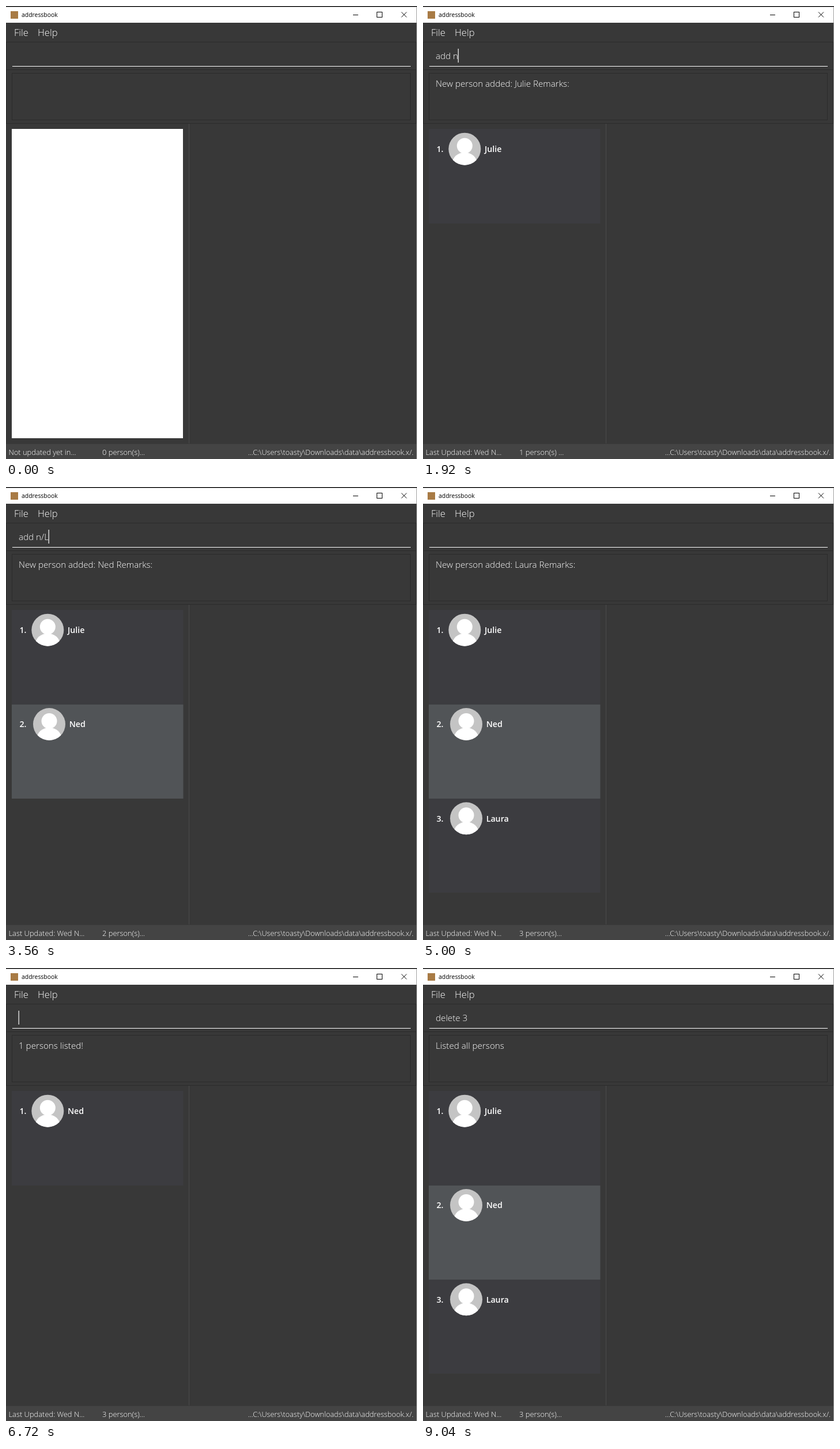
These frames come from a looping animation (713 by 785 pixels, 9.08 s). An HTML page with a canvas:

```html
<!DOCTYPE html>
<html lang="en">
<head>
<meta charset="utf-8">
<title>addressbook</title>
<style>
html, body { margin: 0; width: 100%; height: 100%; overflow: hidden; background: #383838; }
canvas { display: block; }
</style>
</head>
<body>
<canvas id="stage" width="713" height="785"></canvas>
<script>
const ctx = document.getElementById('stage').getContext('2d');
const LOOP = 9080, TICK = 40;
const FAMILY = '"Open Sans", "Noto Sans", sans-serif';
const BG = '#383838', EDGE = '#2b2b2b';
const CARD_TOP = 213.4, CARD_H = 163.3;
const PEOPLE = ['Julie', 'Ned', 'Laura'];

const added = name => `New person added: ${name} Remarks:`;

// Each command: first key, time per key, Enter, and what Enter shows.
const COMMANDS = [
  { text: 'add n/Julie', start: 120, step: 100, enter: 1440,
    message: added('Julie'), list: PEOPLE.slice(0, 1), total: 1 },
  { text: 'add n/Ned', start: 1520, step: 90, enter: 2480,
    message: added('Ned'), list: PEOPLE.slice(0, 2), total: 2 },
  { text: 'add n/Laura', start: 3000, step: 90, enter: 4160,
    message: added('Laura'), list: PEOPLE, total: 3 },
  { text: 'find Ned', start: 5480, step: 130, enter: 6560,
    message: '1 persons listed!', list: ['Ned'], total: 3 },
  { text: 'list', start: 7100, step: 100, enter: 7640,
    message: 'Listed all persons', list: PEOPLE, total: 3 },
  { text: 'delete 3', start: 8240, step: 80, enter: Infinity }
];

function stateAt(t) {
  const s = { input: '', message: '', list: [], total: 0, lastKey: -1000 };
  for (const c of COMMANDS) {
    if (t < c.start) break;
    if (t >= c.enter) {
      Object.assign(s, { message: c.message, list: c.list, total: c.total, lastKey: c.enter, input: '' });
    } else {
      const n = Math.min(c.text.length, Math.floor((t - c.start) / c.step) + 1);
      s.input = c.text.slice(0, n);
      s.lastKey = c.start + (n - 1) * c.step;
    }
  }
  const phase = t % 1000;
  s.caret = t - s.lastKey < 160 || (phase >= 450 && phase < 950);
  return s;
}

function rect(x, y, w, h, color) {
  ctx.fillStyle = color;
  ctx.fillRect(x, y, w, h);
}

function frame(x, y, w, h, color) {
  ctx.strokeStyle = color;
  ctx.lineWidth = 1;
  ctx.strokeRect(x + 0.5, y + 0.5, w - 1, h - 1);
}

function text(str, x, y, size, weight = 300, color = '#fff', align = 'left') {
  ctx.font = `${weight} ${size}px ${FAMILY}`;
  ctx.textAlign = align;
  ctx.fillStyle = color;
  ctx.fillText(str, x, y);
}

function disc(x, y, rx, ry, color) {
  ctx.fillStyle = color;
  ctx.beginPath();
  ctx.ellipse(x, y, rx, ry, 0, 0, Math.PI * 2);
  ctx.fill();
}

function titleBar() {
  rect(0, 0, 713, 1.5, '#000');
  rect(0, 1.5, 713, 27.5, '#fff');
  rect(8, 9, 13, 13, '#a87b45');
  text('addressbook', 27, 19, 10.4, 400, '#000');
  rect(602, 15, 9, 1, '#000');
  frame(643, 10, 10, 10, '#000');
  ctx.beginPath();
  ctx.moveTo(686, 10.5);
  ctx.lineTo(695, 19.5);
  ctx.moveTo(695, 10.5);
  ctx.lineTo(686, 19.5);
  ctx.stroke();
}

function panels() {
  text('File', 14, 52, 16.5);
  text('Help', 55, 52, 16.5);
  frame(0, 62, 712, 49, EDGE);
  rect(11, 104, 691, 1, '#fff');
  frame(0, 110, 712, 94, EDGE);
  frame(10, 116, 692, 82, EDGE);
  rect(317, 204, 1, 554, '#4b4b4b');
}

function avatar(x, y) {
  disc(x, y, 28, 28, '#c4c4c4');
  ctx.save();
  ctx.beginPath();
  ctx.arc(x, y, 28, 0, Math.PI * 2);
  ctx.clip();
  disc(x, y - 5.5, 13.5, 13.5, '#fff');
  disc(x, y + 25, 21.5, 19, '#fff');
  ctx.restore();
}

function card(name, i) {
  const y = CARD_TOP + i * CARD_H;
  const top = Math.round(y), bottom = Math.round(y + CARD_H);
  const base = Math.round(y + 39.6);
  const shift = i ? 2.7 : 0;
  rect(10, top, 297.5, bottom - top, i % 2 ? '#515457' : '#3c3c40');
  text(`${i + 1}.`, 23.5, base, 14.2, 600);
  avatar(72.3 + shift, y + 34.3);
  text(name, 107 + shift, base, 14.2, 600);
}

function statusBar(total) {
  rect(0, 759, 713, 26, '#444');
  text(total ? 'Last Updated: Wed N...' : 'Not updated yet in...', 4.5, 778, 12.9);
  text(`${total} person(s)${total === 1 ? ' ' : ''}...`, 167, 778, 12.9);
  text('...C:\\Users\\toasty\\Downloads\\data\\addressbook.x/.', 707, 778, 12.7, 300, '#fff', 'right');
}

function draw(t) {
  const s = stateAt(t);
  rect(0, 0, 713, 785, BG);
  titleBar();
  panels();
  text(s.input, 22, 92, 15.2);
  if (s.caret) rect(21.5 + ctx.measureText(s.input).width, 74, 1.5, 24, '#d8d8d8');
  text(s.message, 22, 140, 15.2);
  if (s.total) s.list.forEach(card);
  else rect(10, 213, 297, 536, '#fff');
  statusBar(s.total);
  rect(712, 1, 1, 784, '#a0a0a0');
}

const begin = performance.now();
function loop() {
  const t = (performance.now() - begin) % LOOP;
  draw(Math.floor(t / TICK) * TICK);
  requestAnimationFrame(loop);
}
loop();
</script>
</body>
</html>
```
